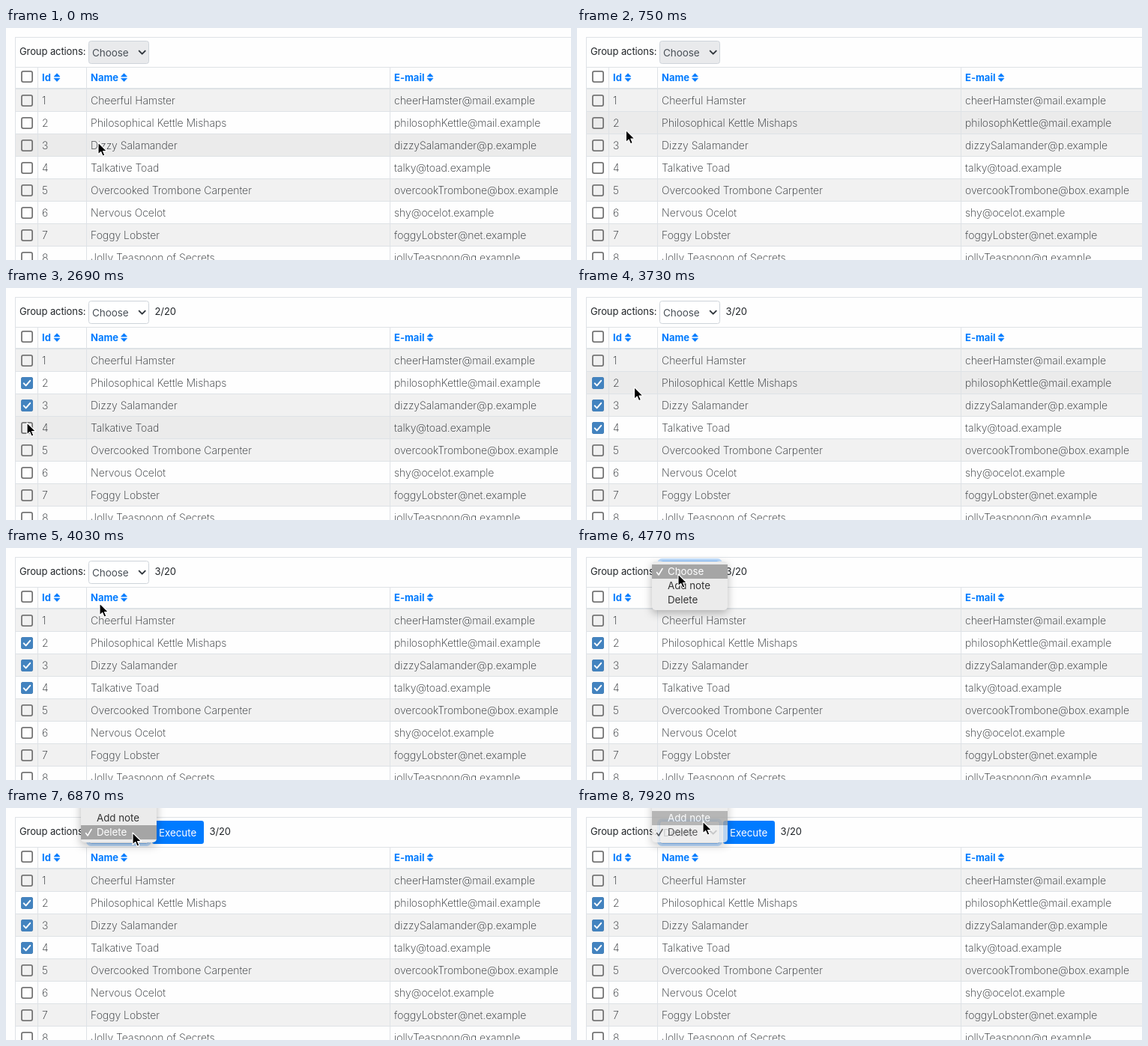
Animation, 754 px wide and 310 px high, one loop 8000 ms. Source, as an HTML page:

```html
<!DOCTYPE html>
<html lang="en">
<head>
<meta charset="utf-8">
<title>Group actions</title>
<style>
html, body { margin: 0; width: 100%; height: 100%; overflow: hidden; background: #fefefe; }
svg { display: block; font: 200 14px Inter, "Open Sans", sans-serif; fill: #212529; }
.line { fill: #dee2e6; }
.label { font-size: 13px; font-weight: 400; letter-spacing: -.1px; }
.head { font-size: 13px; font-weight: 700; fill: #007bff; }
.field { font-size: 13.5px; font-weight: 400; letter-spacing: -.1px; fill: #495057; }
.item { font-size: 13.3px; font-weight: 400; }
.stroke { fill: none; stroke-linecap: round; stroke-linejoin: round; }
#menu { filter: drop-shadow(0 4px 6px rgba(0, 0, 0, .28)); }
</style>
</head>
<body>
<svg id="stage" width="754" height="310" viewBox="0 0 754 310"></svg>
<script>
const LOOP = 8000, STEP = 149.3, LEAD = 5;
const ROW_TOP = 82, ROW_H = 30, ITEM_H = 19;

const people = [
  ['Cheerful Hamster', 'cheerHamster@mail.example'],
  ['Philosophical Kettle Mishaps', 'philosophKettle@mail.example'],
  ['Dizzy Salamander', 'dizzySalamander@p.example'],
  ['Talkative Toad', 'talky@toad.example'],
  ['Overcooked Trombone Carpenter', 'overcookTrombone@box.example'],
  ['Nervous Ocelot', 'shy@ocelot.example'],
  ['Foggy Lobster', 'foggyLobster@net.example'],
  ['Jolly Teaspoon of Secrets', 'jollyTeaspoon@q.example']
];
const options = ['Choose', 'Add note', 'Delete'];

// Pointer path: step, x, y
const path = [
  [1, 123, 153], [8, 28, 126], [9, 28, 126], [11, 27, 140], [14, 28, 156], [16, 28, 156],
  [18, 28, 180], [20, 28, 191], [23, 28, 191], [27, 125, 74], [30, 135, 35], [31, 135, 35],
  [35, 135, 68], [40, 135, 68], [44, 165, 36], [46, 169, 33], [48, 169, 33], [50, 168, 18]
];
// Step at which each row gets ticked
const ticks = { 1: 9, 2: 16, 3: 21 };

const stage = document.getElementById('stage');

function add(tag, attrs, parent = stage, content = '') {
  const node = document.createElementNS('http://www.w3.org/2000/svg', tag);
  set(node, attrs);
  node.textContent = content;
  return parent.appendChild(node);
}
function set(node, attrs) {
  for (const key in attrs) node.setAttribute(key, attrs[key]);
}
const rect = (x, y, width, height, attrs, parent) =>
  add('rect', { x, y, width, height, ...attrs }, parent);
const text = (x, y, content, cls, parent) =>
  add('text', cls ? { x, y, class: cls } : { x, y }, parent, content);
const show = (node, visible) => { node.style.display = visible ? '' : 'none'; };

function checkbox(cy) {
  rect(20.9, cy - 7.1, 14.2, 14.2, { rx: 2.3, fill: 'none', stroke: '#767676', 'stroke-width': 1.8 });
  const on = add('g', {});
  rect(20, cy - 8, 16, 16, { rx: 3, fill: '#4383bf' }, on);
  add('path', { d: `M23.7 ${cy + .4}l2.9 3 5.6-6.6`, class: 'stroke', stroke: '#fff', 'stroke-width': 2 }, on);
  show(on, false);
  return on;
}
function heading(x, label, iconX) {
  text(x, 71, label, 'head');
  add('path', { d: `M${iconX} 65l4-4.3 4 4.3zm0 2.2h8l-4 4.3z`, fill: '#007bff', stroke: '#007bff', 'stroke-width': .6, 'stroke-linejoin': 'round' });
}

// Table
const rowFills = people.map((_, i) => rect(12, ROW_TOP + i * ROW_H, 742, ROW_H, {}));
rect(12, 12, 742, 1, { class: 'line' });
rect(12, 52, 742, 1, { class: 'line' });
rect(12, 80, 742, 2, { class: 'line' });
for (let i = 1; i < people.length; i++) rect(12, ROW_TOP + i * ROW_H - 1, 742, 1, { class: 'line' });
rect(12, 12, 1, 298, { class: 'line' });
for (const x of [42, 107, 512]) rect(x, 52, 1, 258, { class: 'line' });

checkbox(65);
heading(48, 'Id', 64);
heading(113, 'Name', 153.5);
heading(518, 'E-mail', 562);

const marks = people.map(([name, mail], i) => {
  const cy = ROW_TOP + i * ROW_H + 15;
  text(48, cy + 5, i + 1);
  text(113, cy + 5, name);
  text(518, cy + 5, mail);
  return checkbox(cy);
});

// Toolbar
text(18, 36, 'Group actions:', 'label');
const ring = rect(108.5, 15.5, 84, 34, { rx: 5, fill: 'none', stroke: '#bfdeff', 'stroke-width': 3 });
const field = rect(110.5, 17.5, 80, 30, { rx: 3 });
const fieldText = text(115, 38, '', 'field');
add('path', { d: 'M177.7 30.6l4 4 4-4', class: 'stroke', stroke: '#343a40', 'stroke-width': 2 });
const button = add('g', {});
rect(195, 17, 69, 31, { rx: 3.2, fill: '#007bff' }, button);
set(text(204, 37.5, 'Execute', 'item', button), { style: 'fill:#fff' });
const count = text(198.5, 36, '', 'label');

// Drop-down menu
const menu = add('g', { id: 'menu' });
rect(100, -4, 101, 65, { rx: 5, fill: '#ebebeb' }, menu);
const bar = rect(100, 0, 101, ITEM_H, { fill: '#a5a5a5' }, menu);
const items = options.map((label, i) => text(121, i * ITEM_H + 14, label, 'item', menu));
const tick = add('path', { d: 'M106.5 10.5l2.5 3.5 5-8.5', class: 'stroke', 'stroke-width': 1.5 }, menu);

const pointer = add('path', {
  d: 'M0 0v16l3.7-3.5 2.4 5.6 2.8-1.1-2.4-5.5h5.1z',
  fill: '#000', stroke: '#fff', 'stroke-width': 1.1, 'stroke-linejoin': 'round'
});

function pointerAt(step) {
  const next = path.findIndex(p => p[0] >= step);
  if (next < 0) return path[path.length - 1].slice(1);
  if (next === 0) return path[0].slice(1);
  const [a, b] = [path[next - 1], path[next]];
  const u = (step - a[0]) / (b[0] - a[0]);
  const long = Math.hypot(b[1] - a[1], b[2] - a[2]) > 60;
  const e = long ? u * u * (3 - 2 * u) : u;
  return [a[1] + (b[1] - a[1]) * e, a[2] + (b[2] - a[2]) * e];
}

function menuAt(step, y) {
  const first = step >= 31 && step <= 37;
  const second = step >= 45;
  const top = first ? 22 : -15;
  const hovered = Math.max(0, Math.min(2, Math.floor((y - top) / ITEM_H)));
  return {
    open: first || second,
    top,
    chosen: first ? 0 : 2,
    active: step === 52 ? -1 : hovered,
    opacity: step === 37 ? .18 : step === 53 ? .8 : 1
  };
}

function draw(t) {
  const step = Math.floor((t + LEAD) / STEP);
  const [x, y] = pointerAt(step);
  const hover = Math.floor((y - ROW_TOP) / ROW_H);
  set(pointer, { transform: `translate(${x} ${y})` });

  let selected = 0;
  people.forEach((_, i) => {
    const on = step >= ticks[i];
    selected += on;
    show(marks[i], on);
    set(rowFills[i], { fill: i === hover ? '#ebebeb' : i % 2 ? '#fefefe' : '#f1f1f1' });
  });

  const focus = step >= 31, ready = step >= 38;
  show(ring, focus);
  set(field, { fill: selected ? '#fff' : '#e9eaec', stroke: focus ? '#80bdff' : '#ced4da' });
  fieldText.textContent = ready ? 'Delete' : 'Choose';
  show(button, ready);
  count.textContent = selected ? selected + '/20' : '';
  set(count, { x: ready ? 271.5 : 198.5 });

  const m = menuAt(step, y);
  show(menu, m.open);
  set(menu, { transform: `translate(0 ${m.top})`, opacity: m.opacity });
  show(bar, m.active >= 0);
  set(bar, { y: Math.max(0, m.active) * ITEM_H });
  items.forEach((item, i) => { item.style.fill = i === m.active ? '#fff' : '#333'; });
  set(tick, { transform: `translate(0 ${m.chosen * ITEM_H})`, stroke: m.chosen === m.active ? '#fff' : '#333' });
}

const start = performance.now();
function frame() {
  draw((performance.now() - start) % LOOP);
  requestAnimationFrame(frame);
}
frame();
</script>
</body>
</html>
```
